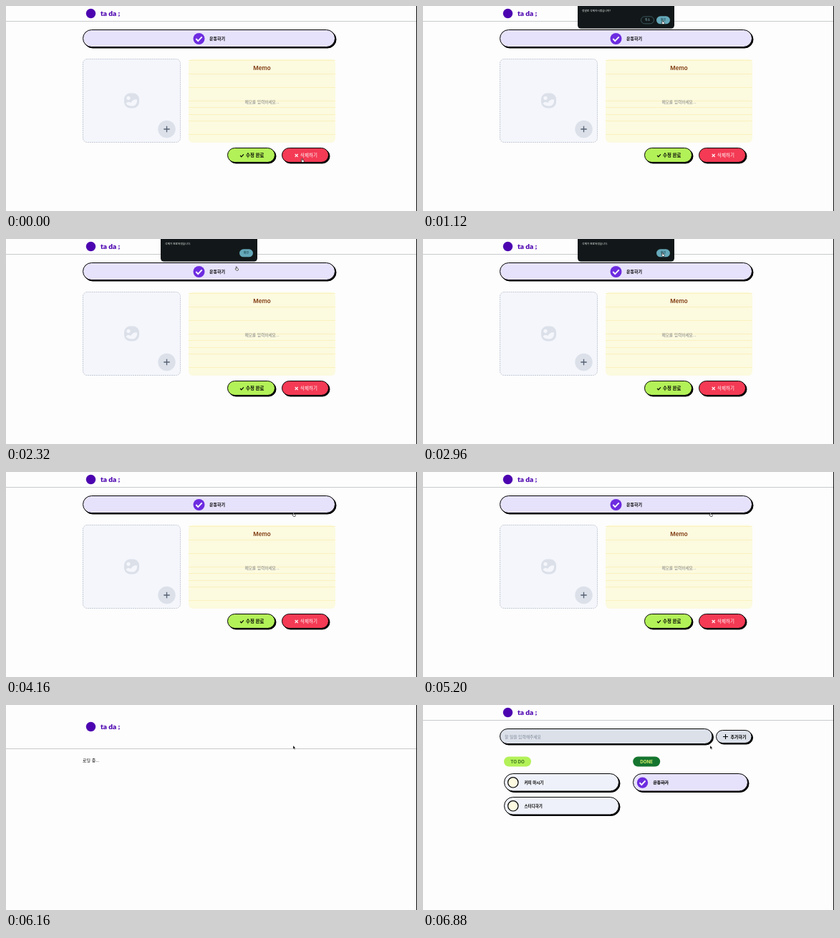
Recreate the animation shown at these times as an HTML page. Size 574 by 288 pixels, loop 6960 ms.

```html
<!DOCTYPE html>
<html lang="ko">
<head>
<meta charset="utf-8">
<style>
html, body { margin: 0; width: 100%; height: 100%; overflow: hidden; background: #fdfdfd; }
svg { display: block; }
text { font-family: "Noto Sans CJK KR", "Noto Sans CJK", "Noto Sans", sans-serif; white-space: pre; }
</style>
</head>
<body>
<svg id="stage" width="574" height="288" viewBox="0 0 574 288"></svg>
<script>
const LOOP = 6960, STEP = 80;
const PURPLE = '#6d2ce0', LILAC = '#e7e2fb', LIME = '#b3f158', GREY = '#dbe0e9';

const text = (s, x, y, size, fill = '#000', weight = 500, more = '') =>
  `<text x="${x}" y="${y}" font-size="${size}" fill="${fill}" font-weight="${weight}" ${more}>${s}</text>`;
const rect = (x, y, w, h, r, fill, more = '') =>
  `<rect x="${x}" y="${y}" width="${w}" height="${h}" rx="${r}" fill="${fill}" ${more}/>`;
const circle = (x, y, r, fill, more = '') =>
  `<circle cx="${x}" cy="${y}" r="${r}" fill="${fill}" ${more}/>`;
const path = (d, stroke, width, more = '') =>
  `<path d="${d}" fill="none" stroke="${stroke}" stroke-width="${width}" ${more}/>`;
const group = (id, body) => `<g id="${id}">${body}</g>`;

// Outlined pill with a hard drop shadow
const pill = (x, y, w, h, fill) =>
  rect(x + 1.5, y + 1.5, w, h, h / 2, '#000', 'stroke="#000"') +
  rect(x, y, w, h, h / 2, fill, 'stroke="#000"');
const plus = (x, y, r, color, width) =>
  path(`M${x - r} ${y}h${2 * r}M${x} ${y - r}v${2 * r}`, color, width);
const tick = (x, y, s, color, width) =>
  path(`M${x - s} ${y}l${s * .7} ${s * .75}l${s * 1.3} ${-s * 1.4}`, color, width);
const done = (x, y, r) => circle(x, y, r, PURPLE) + tick(x, y, r * .52, '#fff', 1.9);

const header =
  group('rule', path('M0 21.5H574', '#c9cacc', 1)) +
  group('brand',
    circle(118.5, 10.5, 6.7, '#4c04b0') +
    text('ta da ;', 132, 14, 10, '#4c04b0', 900, 'style="font-family:Lato,sans-serif"'));

const memoLines = [76.5, 95.5, 114.5, 133.5, 142.5, 152.5, 161.5, 180.5]
  .map(y => path(`M255 ${y}h205`, '#f9f1bf', 1)).join('');

const detail = group('detail',
  pill(107.5, 33.5, 352, 24, LILAC) +
  done(269.5, 46, 8) +
  text('운동하기', 284, 48.3, 6, '#000', 700) +
  rect(107.5, 74.5, 136, 117, 6, '#f4f6fb', 'stroke="#c3c9d5" stroke-dasharray="2 1"') +
  rect(165, 122.5, 21, 21, 8.5, GREY) +
  circle(171, 129.3, 2.6, '#f4f6fb') +
  '<path d="M167.5 137q3-4 6.5-1q4-6 9-4.500v3q-1 6-7 6q-6 0-8.500-3.500z" fill="#f4f6fb"/>' +
  circle(224.5, 173, 12.2, GREY) +
  plus(224.5, 173, 4.2, '#566173', 1.3) +
  rect(255, 74.5, 205, 117.5, 6, '#fcfadf') + memoLines +
  text('Memo', 357.5, 90, 8.1, '#7f3a10', 600, 'text-anchor="middle" style="font-family:Inter,sans-serif"') +
  text('메모를 입력하세요...', 357.5, 136.7, 5.7, '#7d7e82', 400, 'text-anchor="middle"') +
  pill(309.5, 199.5, 66, 20, LIME) +
  tick(329.5, 210, 2.4, '#000', 1.2) +
  text('수정 완료', 335, 212.3, 6.4, '#000', 700) +
  pill(385.5, 199.5, 65, 20, '#f43a54') +
  path('M403.700 208l4 4m0-4l-4 4', '#fff', 1.1) +
  text('삭제하기', 411, 212.3, 6.5, '#fff', 500));

const dialog = (id, message, extra) => group(id,
  rect(216, -6, 135, 39, 5, '#000', 'opacity=".12"') +
  rect(216, -6, 135, 37.5, 4.5, '#121819') +
  text(message, 222, 7.8, 3.7, '#f1f4f4') + extra +
  rect(326, 14.3, 19, 11, 5.5, '#65a9ba') +
  text('확인', 335.5, 21.3, 4, '#0b2c35', 500, 'text-anchor="middle"'));

const confirmBox = dialog('confirm', '정말로 삭제하시겠습니까?',
  rect(304.5, 14.8, 18, 10, 5, 'none', 'stroke="#45666e" stroke-width=".8"') +
  text('취소', 313.5, 21.3, 4, '#8ec3cf', 500, 'text-anchor="middle"'));
const alertBox = dialog('alert', '삭제가 완료되었습니다.', '');

const item = (x, y, label, isDone) =>
  pill(x, y, 160, 24.5, isDone ? LILAC : '#eef1f9') +
  (isDone ? done(x + 13, y + 12.6, 7.7)
          : circle(x + 12.3, y + 12.3, 7.2, '#fcfbe1', 'stroke="#000" stroke-width="1.2"')) +
  text(label, x + 28, y + 14.3, isDone ? 5.8 : 5.5, '#000', 600) +
  (isDone ? path(`M${x + 28} ${y + 12.7}h21.500`, '#000', .6) : '');
const tag = (x, label, fill, color) =>
  rect(x, 72.5, 38, 14, 7, fill) +
  text(label, x + 19, 82, 6.2, color, 700, 'text-anchor="middle" style="font-family:Inter,sans-serif"');

const list = group('list',
  pill(107.5, 33.5, 296.5, 21, GREY) +
  text('할 일을 입력해주세요', 114, 46.5, 5.75, '#7f8897', 400) +
  pill(409.5, 35.5, 49.5, 18, GREY) +
  plus(422.5, 44.5, 3.5, '#000', 1.1) +
  text('추가하기', 429.5, 46.6, 6, '#000', 700) +
  tag(113, 'TO DO', LIME, '#3f7420') +
  tag(293.2, 'DONE', '#15752f', '#d6ef6b') +
  item(113.5, 96.5, '커피 마시기') +
  item(113.5, 129.5, '스터디하기') +
  item(293.5, 96.5, '운동하기', true));

const loading = group('loading', text('로딩 중...', 107, 80, 6));

const cursor = group('cursor',
  '<path id="hand" d="M0 .5q.8-.8 1.200 0v1.800l1.600.5q.7.300.5 1.200l-.5 1.500h-2.300l-1.500-2q.3-.8 1 0z" fill="#fff" stroke="#000" stroke-width=".6"/>' +
  '<path id="arrow" d="M0 0v4.700l1.100-1l.8 1.900l.9-.4l-.8-1.800h1.500z" fill="#000" stroke="#fff" stroke-width=".3"/>');

const stage = document.getElementById('stage');
stage.innerHTML = rect(0, 0, 574, 288, 0, '#fdfdfd') + header + detail + list + loading +
  confirmBox + alertBox + rect(573, 0, 1, 288, 0, '#111') + cursor;

const el = id => document.getElementById(id);
const show = (id, alpha) => el(id).setAttribute('opacity', +alpha);
const move = (id, x, y) => el(id).setAttribute('transform', `translate(${x} ${y})`);
const clamp = v => Math.max(0, Math.min(1, v));
const fade = (t, from, to) => Math.min(clamp((t - from + STEP) / 160), clamp((to - t) / 160));

// Pointer stops: time, x, y
const stops = [
  [0, 413, 214], [80, 413, 214], [960, 334, 20], [1280, 334, 20], [1440, 325, 34],
  [1920, 318, 43.5], [2160, 318, 43.5], [2720, 334, 19], [3280, 334, 19],
  [3600, 401, 57], [LOOP, 401, 57]
];
function pointer(t) {
  const i = stops.findIndex(s => s[0] > t), a = stops[i - 1], b = stops[i];
  const p = (t - a[0]) / (b[0] - a[0]), e = p * p * (3 - 2 * p);
  return [a[1] + (b[1] - a[1]) * e, a[2] + (b[2] - a[2]) * e];
}

function draw(now) {
  const t = Math.floor(now % LOOP / STEP) * STEP;
  const isList = t >= 6320;
  const isLoading = t === 5680 || t >= 6080 && !isList;
  const isArrow = t >= 5680;
  show('detail', !isList && !isLoading);
  show('list', isList);
  show('loading', isLoading);
  show('confirm', fade(t, 80, 1400));
  show('alert', fade(t, 2160, 3200));
  show('hand', !isArrow);
  show('arrow', isArrow);
  move('rule', 0, isLoading ? 40 : 0);
  move('brand', 0, isLoading ? 20 : 0);
  move('cursor', ...pointer(t));
}

const start = performance.now();
function loop() {
  draw(performance.now() - start);
  requestAnimationFrame(loop);
}
loop();
</script>
</body>
</html>
```
